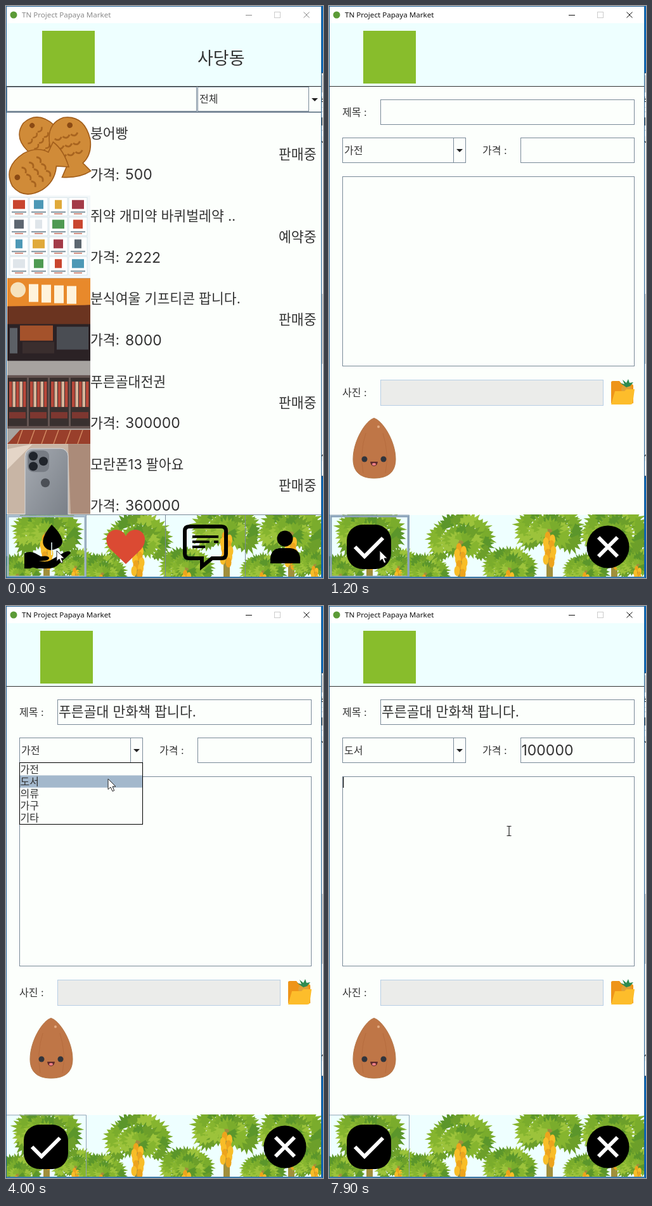
Animation, 500 px wide and 900 px high, one loop 8 s. Source, as an HTML page:

```html
<!DOCTYPE html>
<html lang="ko">
<head>
<meta charset="utf-8">
<style>
html, body { margin: 0; width: 100%; height: 100%; overflow: hidden; background: #0a84dc }
svg { display: block; width: 500px; height: 900px }
text { font-family: Inter, "Noto Sans CJK KR", sans-serif; white-space: pre }
.ui { font-family: "Noto Sans", "Noto Sans CJK KR", sans-serif }
</style>
</head>
<body>
<svg id="stage" viewBox="0 0 500 900"></svg>
<script>
const AZURE = '#eeffff', PAPER = '#fcfffc', EDGE = '#7a8a99', INK = '#333';
const BOOK = '푸른골대';

// Drawing helpers: every one returns SVG markup
const R = (x, y, w, h, fill, stroke = 'none', more = '') =>
  `<rect x="${x}" y="${y}" width="${w}" height="${h}" fill="${fill}" stroke="${stroke}" ${more}/>`;
const box = (x, y, x2, y2, fill = PAPER, stroke = EDGE) => R(x + .5, y + .5, x2 - x - 1, y2 - y - 1, fill, stroke);
const P = (d, fill, stroke = 'none', w = 1, more = '') =>
  `<path d="${d}" fill="${fill}" stroke="${stroke}" stroke-width="${w}" ${more}/>`;
const line = (d, color, w = 1) => P(d, 'none', color, w);
const C = (x, y, r, fill) => `<circle cx="${x}" cy="${y}" r="${r}" fill="${fill}"/>`;
const E = (x, y, rx, ry, fill) => `<ellipse cx="${x}" cy="${y}" rx="${rx}" ry="${ry}" fill="${fill}"/>`;
const T = (x, cy, size, str, fill = INK, more = '') =>
  `<text x="${x}" y="${cy + .36 * size}" font-size="${size}" fill="${fill}" ${more}>${str}</text>`;
const ui = (x, cy, str, fill = '#222') =>
  T(x, cy, /[가-힣]/.test(str) ? 12.8 : 11.8, str, fill, 'class="ui"');
const G = (id, body) => `<g id="${id}">${body}</g>`;
const times = (n, f) => Array.from({ length: n }, (_, i) => f(i)).join('');

let seed = 7;
const rnd = () => (seed = seed * 16807 % 2147483647) / 2147483647;

// Desktop with the file explorer
const folder = (x, y, fill = '#f8d775') =>
  P(`M${x} ${y - 7}h6l2 2h5v12h-13z`, fill) + R(x + 9, y - 4, 4, 11, '#fbe6a2');

function explorer() {
  const places = [['3D 개체', '#27aecb'], ['다운로드', '#2f8fdc'], ['동영상', '#4c5561'], ['문서', '#8fb4d6']];
  const folders = ['download_wmm', 'GOMEncoder', 'GOMPlayer', 'My CamStudio Temp Files', 'My CamStudio Videos',
    'VideoWinSoft', '사용자 지정 Office 서식 파', '카카오톡 받은 파일'];
  const more = [['바탕 화면', '#1c8ae0'], ['사진', '#9cc3de'], ['음악', '#2a92e0'], ['로컬 디스크 (C:)', '#8b9299']];
  const drive = ['$SysReset', '$WinREAgent', '6031', 'app', 'BYEOL', 'tutorial'];
  let row = 0, s = '';
  const next = () => 215 + 24.05 * row++;
  const place = ([name, color]) => {
    const y = next();
    s += (name == '다운로드' ? P(`M321 ${y - 7}h6v6h5l-8 8l-8-8h5z`, color)
      : name == '음악' ? line(`M323 ${y + 5}v-12q2 5 6 6`, color, 2) + E(321, y + 5, 3, 2.5, color)
      : R(317, y - 6, 14, 12, color) + R(319, y - 3, 10, 4, '#e4f1fa')) + ui(337, y, name);
  };
  const sub = name => {
    const y = next();
    s += folder(326, y, name[0] == '$' ? '#fbe9b8' : undefined) + ui(345, y, name);
  };
  places.forEach(place);
  folders.forEach(sub);
  more.forEach(place);
  drive.forEach(sub);
  return R(272, 104, 240, 640, '#003a78', 'none', 'opacity=".25"') + R(276, 105.5, 240, 634, '#fff', '#5a6b7a')
    + R(482, 109, 20, 27, '#cfcfcf') + folder(286, 120) + folder(341, 120)
    + line('M307.5 114v12M378.5 114v12', '#888') + R(319.5, 114.5, 11, 13, '#fff', '#999')
    + line('M321 120l3 3l5-6', '#c0562d', 1.5) + P('M362 121h7l-3.5 4zM362 118h7v1h-7z', '#222')
    + R(276, 136, 56, 23, '#1163ad') + ui(292, 147, '파일', '#fff') + ui(347, 147, '홈') + ui(388, 147, '공유')
    + ui(441, 147, '보기') + ui(496, 147, '비디오') + line('M276 159.5H500', '#ddd')
    + line('M301 181h-11m5-5l-5 5l5 5', '#555', 1.5) + line('M319 181h11m-5-5l5 5l-5 5', '#ccc', 1.5)
    + line('M346 179l3 3l3-3', '#777', 1.5) + line('M369.5 188v-12m-5 5l5-5l5 5', '#555', 1.5)
    + R(383.5, 166.5, 130, 29, '#fff', '#ccc') + folder(388, 181) + line('M409 178l3 3l-3 3M463 178l3 3l-3 3', '#555', 1.3)
    + ui(423, 181, '내 PC') + ui(477, 181, '문서')
    + R(276, 396, 213, 24, '#d9d9d9') + `<g clip-path="url(#tree)">${s}</g>`
    + R(489, 205, 12, 511, '#f0f0f0') + R(489, 453, 12, 110, '#c8c8c8')
    + line('M492 215l4-4l4 4M492 706l4 4l4-4', '#444', 1.5)
    + ui(291, 728, '1개 항목') + ui(359, 728, '1개 항목 선택함 245MB');
}

const desktop = R(0, 0, 500, 900, 'url(#sky)') + P('M0 74L276 148V153L0 78z', '#4fb4f4', 'none', 0, 'opacity=".45"')
  + P('M0 78L276 153V700L0 690z', '#18a0ff', 'none', 0, 'opacity=".14"') + explorer();

// Papaya grove along the bottom
function leaf(x, y, r, a, fill) {
  let d = `M${x.toFixed(1)} ${y.toFixed(1)}`;
  for (let i = -8; i <= 8; i++) {
    const q = a + i * .19, k = i % 2 ? r * .62 : r * (1.05 - .05 * Math.abs(i));
    d += `L${(x + k * Math.cos(q)).toFixed(1)} ${(y + k * Math.sin(q)).toFixed(1)}`;
  }
  return P(d + 'z', fill);
}
function tree(x, y, s) {
  const greens = ['#6c9f2a', '#86b52f', '#5b962b', '#9cc33b', '#7aac2c'];
  const ring = (n, reach, r) => times(n, i => {
    const a = -Math.PI / 2 + (i / (n - 1) - .5) * 4.1, d = reach * s;
    return leaf(x + 1.25 * d * Math.cos(a), y + d * Math.sin(a) + 8 * s, (r + 7 * rnd()) * s,
      a + .5 * Math.cos(a) + rnd() * .6 - .3, greens[i * 3 % 5]);
  });
  return R(x - 5 * s, y, 10 * s, 100, '#a08f3c') + ring(11, 27, 20) + ring(8, 12, 20) + ring(5, 3, 15)
    + times(10, i => E(x + (i % 2 * 2 - 1) * (3 + 1.5 * (i % 3)) * s, y + (17 + 4.5 * i) * s, 4.5 * s, 8 * s, i % 3 ? '#f8bd28' : '#eda41d'));
}
const grove = `<g clip-path="url(#bar)">${R(1, 801, 497, 98, AZURE)}${
  [[18, 890, .7], [64, 822, 1], [110, 878, .65], [152, 888, .7], [208, 836, 1], [285, 880, .8], [348, 818, 1],
   [405, 885, .65], [450, 822, 1], [487, 875, .65]].map(a => tree(...a)).join('')}</g>`;

// Application window
const win = (ink, logoX, body) =>
  R(.5, .5, 497, 899, PAPER, '#1f5f94') + R(1, 1, 496, 26, '#fff') + C(12, 14, 5.5, '#5b9b37')
  + T(25, 13.5, 11.6, 'TN Project Papaya Market', ink, 'class="ui"')
  + line('M378 14.5h10M469.5 9.5l9 9m0-9l-9 9', ink) + R(423.5, 9.5, 9, 9, 'none', '#ccc')
  + R(1, 27, 496, 99, AZURE) + R(logoX, 39, 83, 83, '#88bd2c') + R(1, 126, 496, 1, INK)
  + body + line('M1 899H498', '#3b78a8', 2);
const down = (x, y) => P(`M${x - 5} ${y - 2}h10l-5 5z`, '#222');

// Product pictures, each drawn in a 131 by 130 cell
const fish = (x, y, turn, size) => `<g transform="translate(${x} ${y}) rotate(${turn}) scale(${size})">`
  + P('M-40 0Q-36-30 0-29Q22-26 30-10L44-18Q50 0 42 24L28 13Q14 30-8 29Q-38 26-40 0z', '#d08b38', '#a25e1b', 1.5)
  + times(9, i => line(`M${-14 + i % 3 * 13} ${-14 + (i / 3 | 0) * 12}q6 5 0 10`, '#a8641f', 2.5)) + C(-27, -6, 4, '#8a4a14') + '</g>';
const pics = [
  R(0, 0, 131, 130, '#fff') + fish(56, 42, 40, 1) + fish(100, 50, 75, 1.1) + fish(44, 90, -35, 1.1),
  R(0, 0, 131, 130, '#f3f7f9') + times(16, i => {
    const x = 4 + i % 4 * 31, y = 3 + (i / 4 | 0) * 31;
    return R(x, y, 29, 29, '#fff', '#d6e4ea')
      + R(x + 5 + i % 3 * 2, y + 4, 19 - i % 3 * 4, 14, ['#c9452f', '#dfe5ea', '#a33a48', '#4d98b6', '#4f9a52', '#5d6670', '#e0a93a'][i * 3 % 7])
      + R(x + 3, y + 22, 23, 2, '#7d929d') + R(x + 8, y + 25, 13, 1.5, '#c6705f');
  }),
  R(0, 0, 131, 130, '#2b2225') + P('M0 0H131V42L0 50z', '#e8892b') + C(17, 18, 12, '#f6e2bd')
    + times(4, i => R(34 + i * 20, 9 + i, 15, 28, '#fff3dc')) + P('M0 44L131 42V72L0 72z', '#6b3420')
    + R(20, 74, 52, 24, '#a4522b') + R(78, 76, 50, 36, '#4a4d53') + R(4, 78, 12, 40, '#5c6066') + R(24, 100, 50, 18, '#3a2e2e'),
  R(0, 0, 131, 130, '#a7a3a0') + R(0, 22, 131, 84, '#655552') + times(4, i => R(1 + i * 33, 26, 30, 76, '#39302f')
    + times(5, k => R(3 + i * 33 + k * 5.5, 32, 4.5, 40, k % 2 ? '#d7b69b' : '#b8483a')) + R(3 + i * 33, 80, 26, 10, '#7d3730'))
    + P('M0 130L20 108H131V130z', '#993f2b') + times(6, i => line(`M${24 + i * 19} 108l-8 22`, '#d28a62', 1.5)),
  R(0, 0, 131, 110, '#c8b5a5') + P('M0 8L40 0L0 40z', '#e4d5c7') + P('M96 0H131V110H100z', '#ab8b79')
    + R(28, 7, 68, 120, 'url(#metal)', '#d7d9dc', 'rx="12"') + R(32, 10, 34, 34, '#777c84', 'none', 'rx="9"')
    + C(41, 19, 7, '#20242b') + C(41, 35, 7, '#20242b') + C(57, 27, 7, '#20242b') + C(60, 61, 7, '#4b4f56')
];
const goods = [['붕어빵', '판매중', 500], ['쥐약 개미약 바퀴벌레약 ..', '예약중', 2222], ['분식여울 기프티콘 팝니다.', '판매중', 8000],
  [BOOK + '전권', '판매중', 300000], ['모란폰13 팔아요', '판매중', 360000]];

const icons =
  P('M29 861q9-4 17 0l9 5q13-2 13 3q-1 4-11 4l-5 0q14 3 20-2l21-12q8-3 9 2l-22 20q-6 4-14 4H48q-6-3-10 0H29z', '#000')
  + P('M72 816Q52 840 61 851Q66 857 72 856Q88 853 89 843Q88 831 72 816z', '#000') + line('M72 844V864', AZURE, 1.5)
  + P('M189 878L165 855C152 841 160 824 174 824Q184 824 189 834Q194 824 204 824C218 824 225 841 213 855z', '#db4a33')
  + P('M289 819H340Q347 819 347 826V862Q347 869 340 869H325L309 882V869H289Q282 869 282 862V826Q282 819 289 819z', 'none', '#000', 6)
  + line('M294 835H335M294 843H321M328 843H335M294 851H314', '#000', 4)
  + C(440, 838, 12.5, '#000') + P('M417 877V868Q419 854 432 853H448Q462 854 464 868V877z', '#000');

const shop = win('#8a8a8a', 57,
  T(302, 82, 27, '사당동') + R(1, 127, 496, 41, '#dfe7ee') + box(1, 127, 301, 166) + box(302, 127, 478, 166) + R(478, 128, 19, 38, PAPER)
  + T(305, 146, 16, '전체') + down(487, 147) + R(1, 166, 496, 2, EDGE)
  + '<g clip-path="url(#list)">' + goods.map(([name, state, price], i) => {
    const y = 168 + i * 130.3;
    return `<g transform="translate(2 ${y})">${pics[i]}</g>` + T(133, y + 32, 21.6, name) + T(430, y + 65, 21.6, state)
      + T(133, y + 97, 21.6, '가격:') + T(188, y + 97, 23, price);
  }).join('') + '</g>'
  + grove + line('M1 800.5H497M126.5 801V899M251.5 801V899M377.5 801V899', EDGE)
  + R(3, 803, 122, 95, 'none', '#9fb3c6', 'stroke-width="3"') + icons);

const seedFace = P('M71 648.5C58 652 38 684 38 713C38 735 52 743 71 743C91 743 105 735 105 713C105 684 84 652 71 648.5z', '#bf7647', '#b27848')
  + line('M58 672Q48 704 54 735M85 672Q95 704 89 735', '#b66c3e') + C(56, 713, 4.5, '#30343c') + C(86, 713, 4.5, '#30343c')
  + P('M65 717H77Q76 724 71 724Q66 724 65 717z', '#5d2b2c') + E(71, 721, 3, 2, '#f07f86') + C(78, 662, 2, '#e4ad84');
const pineapple = P('M445 592q0-2 3-2h10l4 5h15q3 0 3 3v27h-35z', '#ee9418') + E(469, 603, 8, 8, '#e0a136')
  + P('M469 600L459 593L466 595L463 588L469 593L472 587L474 593L480 592L475 598z', '#2e8a50')
  + P('M445 627L451 606H466L469 603H482L479 625Q478 627 475 627z', '#fdbd2b');

const form = win('#111', 54,
  T(21, 167, 16, '제목 :') + box(81, 147, 482, 187) + T(83, 166, 21.6, '', INK, 'id="title"')
  + box(21, 207, 216, 247) + line('M196.5 208V246', EDGE) + down(206, 227) + T(24, 227, 16, '', INK, 'id="kind"')
  + T(242, 227, 16, '가격 :') + box(302, 207, 482, 247) + T(303.5, 227, 23, '', INK, 'id="price"')
  + box(21, 268, 482, 567) + T(21, 608, 16, '사진 :') + box(81, 588, 433, 629, '#ebecea', '#b8cfe5')
  + pineapple + seedFace + grove + line('M1 801H126.5V899', '#8fa3b5')
  + G('focus', R(3, 803, 122, 95, 'none', '#8ba3ba', 'stroke-width="3"'))
  + R(28, 816, 70, 70, '#000', 'none', 'rx="25"') + line('M41 851L56 866L85 837', '#fff', 6)
  + C(440, 851, 33.5, '#000') + line('M425 836L455 866M455 836L425 866', '#fff', 6)
  + G('popup', box(21, 246, 216, 344, PAPER, '#000') + R(22, 247, 193, 19.2, '#a3b8cc', 'none', 'id="pick"')
    + ['가전', '도서', '의류', '가구', '기타'].map((s, i) => T(22.5, 257 + 19 * i, 16, s)).join(''))
  + R(0, 0, 1.3, 24, '#222', 'none', 'id="caret"'));

stage.innerHTML = `<defs>
  <linearGradient id="sky" x2="1" y2=".25"><stop stop-color="#0a8ae6"/><stop offset=".5" stop-color="#0683df"/><stop offset="1" stop-color="#0063b4"/></linearGradient>
  <linearGradient id="metal" x2="1" y2="1"><stop stop-color="#a6abb2"/><stop offset="1" stop-color="#777d85"/></linearGradient>
  <clipPath id="tree">${R(276, 205, 213, 511)}</clipPath><clipPath id="bar">${R(1, 800, 496, 98)}</clipPath>
  <clipPath id="list">${R(1, 168, 496, 632)}</clipPath></defs>`
  + desktop + G('shop', shop) + G('form', form)
  + G('arrow', P('M0 0V16.5L4 13L7 19.5L9.7 18.3L7 12H12z', '#fff', '#222'))
  + G('beam', line('M-3.5-7.5h3l.5 1l.5-1h3M0-7V7M-3.5 7.5h3l.5-1l.5 1h3', '#222', 1.2));

// Motion
const $ = id => document.getElementById(id);
const clamp = v => Math.max(0, Math.min(1, v));
const show = (id, on) => $(id).setAttribute('visibility', on ? 'visible' : 'hidden');
const path = [[1400, 80, 857], [2200, 111, 152], [3400, 111, 152], [3800, 206, 228], [4000, 161, 272], [4800, 161, 272],
  [5500, 336.5, 225], [6300, 336.5, 225], [6500, 470, 222], [7300, 470, 222], [7800, 284, 354]];

function pointer(t) {
  const i = path.findIndex(p => p[0] > t);
  if (i < 1) return path.at(i).slice(1);
  const [a, b] = [path[i - 1], path[i]], k = (t - a[0]) / (b[0] - a[0]), e = k * k * (3 - 2 * k);
  return [a[1] + (b[1] - a[1]) * e, a[2] + (b[2] - a[2]) * e];
}
function fade(id, alpha, scale) {
  show(id, alpha > 0);
  $(id).setAttribute('opacity', alpha);
  $(id).setAttribute('transform', `translate(248 450) scale(${scale}) translate(-248 -450)`);
}
function caret(t) {
  const end = (id, x) => x + $(id).getComputedTextLength();
  if (t >= 2300 && t < 3800) return [end('title', 83), 155];
  if (t >= 5500 && t < 7800 && !(t >= 5900 && t < 6200)) return [end('price', 304), 215];
  if (t >= 7800) return [22, 269, 17];
}
function draw(now) {
  const t = Math.floor(now % 8000 / 100) * 100;
  const out = clamp((t - 500) / 300), rise = clamp((t - 900) / 300);
  fade('shop', t < 600 ? 1 : t < 900 ? 1 - .93 * out : 0, 1 - .045 * out);
  fade('form', rise, .93 + .07 * rise);

  const [x, y] = pointer(t), open = t >= 3800 && t < 4400;
  const inside = (x1, y1, x2, y2) => x > x1 && x < x2 && y > y1 && y < y2;
  const inField = t >= 1400 && !open
    && (inside(81, 147, 482, 187) || inside(302, 207, 482, 247) || inside(21, 267, 482, 568));
  show('arrow', !inField);
  show('beam', inField);
  $(inField ? 'beam' : 'arrow').setAttribute('transform', `translate(${x} ${y})`);

  $('title').textContent = (BOOK + ' 만화책 팝니다.').slice(0, Math.round(13 * clamp((t - 2400) / 1000)));
  $('kind').textContent = t < 4400 ? '가전' : '도서';
  $('price').textContent = t < 6200 ? '' : '100000'.slice(0, 1 + Math.round(5 * clamp((t - 6600) / 500)));
  show('popup', open);
  $('pick').setAttribute('y', y > 266 ? 266.5 : 247);
  show('focus', t >= 1000 && t < 2200);

  const c = caret(t);
  show('caret', c);
  if (c) {
    $('caret').setAttribute('x', c[0]);
    $('caret').setAttribute('y', c[1]);
    $('caret').setAttribute('height', c[2] || 24);
  }
}
const start = performance.now();
(function loop() {
  draw(performance.now() - start);
  requestAnimationFrame(loop);
})();
</script>
</body>
</html>
```
